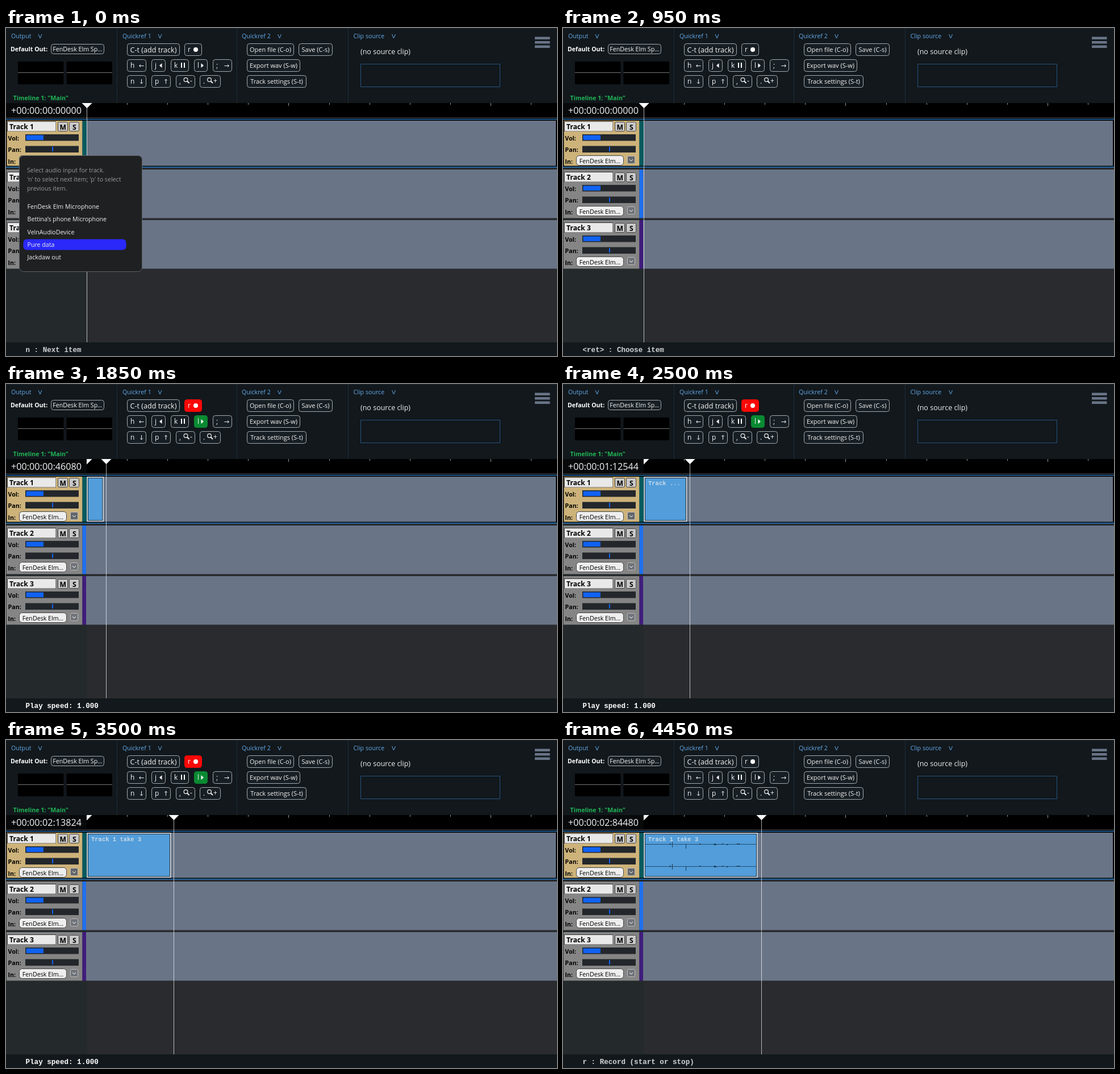
An HTML page with a canvas that plays this animation: 970 by 577 pixels, repeating every 4500 ms.

```html
<!DOCTYPE html>
<html lang="en">
<head>
<meta charset="utf-8">
<title>Audio workstation</title>
<style>
html, body { margin: 0; width: 100%; height: 100%; overflow: hidden; background: #12181c; }
canvas { display: block; }
</style>
</head>
<body>
<canvas id="stage" width="970" height="577"></canvas>
<script>
const ctx = document.getElementById('stage').getContext('2d');
const LOOP = 4500, STEP = 50;
const CLOSE = 750, REC = 1370, STOP = 4238;
const ORIGIN = 142.3, PX_PER_SEC = 71.12, RATE = 96000, BLOCK = 1024;
const TAIL = 2; // blocks played after the last clock update
const SANS = '"Open Sans", "Noto Sans", sans-serif';
const MONO = '"Liberation Mono", "DejaVu Sans Mono", monospace';
const BODY = 10.67;
const BACK = '#292b2e', FOCUS = '#2a86d6';
const DEVICE = 'FenDesk Elm';
const INPUTS = [DEVICE + ' Microphone', 'Bettina’s phone Microphone', 'VelnAudioDevice', 'Pure data', 'Jackdaw out'];

// time in ms, audio blocks played
const PROGRESS = [[REC, 0], [1850, 45], [2500, 106], [3100, 164], [3950, 243], [STOP, 270]];

function blocksAt(t) {
  if (t <= REC) return 0;
  for (let i = 1; i < PROGRESS.length; i++) {
    const [t0, b0] = PROGRESS[i - 1], [t1, b1] = PROGRESS[i];
    if (t <= t1) return Math.round(b0 + (b1 - b0) * (t - t0) / (t1 - t0));
  }
  return PROGRESS[PROGRESS.length - 1][1];
}

const blockX = blocks => ORIGIN + blocks * BLOCK / RATE * PX_PER_SEC;

function rect(x, y, w, h, color) {
  ctx.fillStyle = color;
  ctx.fillRect(x, y, w, h);
}

function frame(x, y, w, h, color) {
  ctx.strokeStyle = color;
  ctx.lineWidth = 1;
  ctx.strokeRect(x + .5, y + .5, w - 1, h - 1);
}

function roundBox(x, y, w, h, r, fill, stroke) {
  ctx.beginPath();
  ctx.roundRect(x + .5, y + .5, w - 1, h - 1, r);
  ctx.fillStyle = fill;
  ctx.fill();
  if (stroke) {
    ctx.strokeStyle = stroke;
    ctx.lineWidth = 1;
    ctx.stroke();
  }
}

function text(str, x, y, color, size = BODY, weight = 400, align = 'left', family = SANS) {
  ctx.font = `${weight} ${size}px ${family}`;
  ctx.textAlign = align;
  ctx.fillStyle = color;
  ctx.fillText(str, x, y);
}

function poly(points, color) {
  ctx.beginPath();
  points.forEach(([x, y]) => ctx.lineTo(x, y));
  ctx.fillStyle = color;
  ctx.fill();
}

function line(points, color, width = 1) {
  ctx.beginPath();
  points.forEach(([x, y]) => ctx.lineTo(x, y));
  ctx.strokeStyle = color;
  ctx.lineWidth = width;
  ctx.stroke();
}

function button(x, y, w, label, size = 11, h = 22) {
  roundBox(x, y, w, h, 4, '#181f24', '#a3abb0');
  text(label, x + w / 2, y + h / 2 + size * .36, '#f4f4f4', size, 400, 'center');
}

function key(x, y, w, label, lit) {
  roundBox(x, y, w, 22, 4, lit || '#181f24', lit || '#a3abb0');
  text(label, x + 6, y + 15, '#f4f4f4', 12);
}

function arrow(x, y, angle) {
  ctx.save();
  ctx.translate(x, y);
  ctx.rotate(angle);
  line([[-4, 0], [3.5, 0]], '#eee');
  line([[1.5, -2.3], [4, 0], [1.5, 2.3]], '#eee');
  ctx.restore();
}

function magnifier(x, y) {
  ctx.beginPath();
  ctx.arc(x, y, 3.4, 0, Math.PI * 2);
  ctx.strokeStyle = '#eee';
  ctx.lineWidth = 1.2;
  ctx.stroke();
  line([[x + 2.5, y + 2.5], [x + 6, y + 6]], '#eee', 2);
}

function heading(label, x, chevronX) {
  text(label, x, 18, '#62a9ea');
  line([[chevronX - 3, 11], [chevronX, 18], [chevronX + 3, 11]], '#62a9ea');
}

function drawPanel(recording) {
  rect(0, 0, 970, 132, '#12181c');
  rect(0, 0, 970, 1, '#1b2730');
  for (const x of [195, 406, 602]) rect(x, 1, 1, 131, '#1d2e3c');

  heading('Output', 9, 60);
  heading('Quickref 1', 205, 271);
  heading('Quickref 2', 415, 481.5);
  heading('Clip source', 611.5, 682.5);

  text('Default Out:', 8, 41, '#fff', 10.6, 700);
  button(79, 28, 94, DEVICE + ' Sp...', BODY, 18);
  for (const x of [21, 106.5]) {
    rect(x, 59, 80.5, 40, '#000');
    rect(x, 78, 80.5, 1, '#777');
  }
  text('Timeline 1: "Main"', 12.5, 127, '#20b656', 10.66, 700);

  button(213, 27, 93, 'C-t (add track)', 12.6);
  key(314, 27, 31, 'r', recording && '#fa0808');
  ctx.beginPath();
  ctx.arc(334, 38, 4, 0, Math.PI * 2);
  ctx.fillStyle = '#fff';
  ctx.fill();

  key(213, 55, 34, 'h');
  arrow(238.5, 66.5, Math.PI);
  key(256, 55, 25, 'j');
  poly([[274.5, 62], [274.5, 70], [270, 66]], '#fff');
  key(290, 55, 32, 'k');
  rect(308, 61, 2, 9, '#fff');
  rect(313, 61, 2, 9, '#fff');
  key(331, 55, 24, 'l', recording && '#0a8a32');
  poly([[343.5, 62], [343.5, 70], [348, 66]], '#fff');
  key(364, 55, 34, ';');
  arrow(388.5, 66.5, 0);

  key(213, 83, 34, 'n');
  arrow(238.5, 94, Math.PI / 2);
  key(256, 83, 34, 'p');
  arrow(281.5, 94, -Math.PI / 2);
  key(299, 83, 34, ',');
  magnifier(316.5, 91);
  text('-', 324, 97, '#f4f4f4', 12);
  key(341, 83, 37, '.');
  magnifier(358, 91);
  text('+', 365, 97, '#f4f4f4', 12);

  button(424, 27, 83, 'Open file (C-o)');
  button(515, 27, 60, 'Save (C-s)');
  button(424, 55, 94, 'Export wav (S-w)');
  button(424, 83, 105, 'Track settings (S-t)');

  text('(no source clip)', 624, 46, '#f0f0f0', 12.5);
  frame(624, 63, 246, 41, '#27507c');
  for (let i = 0; i < 3; i++) rect(931, 15.5 + i * 7.5, 26.5, 4.5, '#697487');
}

function drawRuler(blocks) {
  rect(0, 132, 970, 25, '#000');
  rect(0, 132, 142, 25, '#08090a');
  for (let i = 1; i < 12; i++) {
    rect(Math.round(ORIGIN + i * PX_PER_SEC - .5), 132, 1, i % 5 ? 3 : 5, '#9a9a9a');
  }
  const samples = blocks * BLOCK;
  const secs = String(Math.floor(samples / RATE)).padStart(2, '0');
  const rest = String(samples % RATE).padStart(5, '0');
  text(`+00:00:${secs}:${rest}`, 9, 150.5, '#f4f4f4', 16.2);
}

function drawTrack(n) {
  const y = 160 + (n - 1) * 89, selected = n === 1;
  rect(141, y, 829, 85.4, '#697487');
  rect(0, y, 134.5, 85.4, selected ? '#cdb37a' : '#858585');
  rect(134.5, y, selected ? 7.5 : 6.5, 85.4, ['#075a5e', '#2070ee', '#401c7c'][n - 1]);
  rect(0, y, 1, 85.4, '#3a3c3d');

  if (selected) {
    rect(0, 159, 970, 4, '#000');
    rect(0, 242.5, 970, 3, '#000');
    rect(0, 160, 970, 1.2, FOCUS);
    rect(0, 244, 970, 1.4, FOCUS);
    rect(0, 162, 1.5, 82, '#000');
    rect(968, 162, 2, 82, '#000');
  }

  rect(2, y + 4, 86, 18, '#333');
  rect(3, y + 5, 84.5, 16.5, '#e9e9e9');
  text('Track ' + n, 6, y + 18, '#000', 12.2, 700);
  for (const [label, x] of [['M', 91], ['S', 111]]) {
    roundBox(x, y + 5, 18, 17, 2, '#c9c9c9', '#444');
    text(label, x + 9.3, y + 18.5, '#000', 12.2, 700, 'center');
  }

  text('Vol:', 3.5, y + 37.5, '#000', BODY, 700);
  text('Pan:', 3.5, y + 58, '#000', BODY, 700);
  text('In:', 3.5, y + 78.5, '#000', BODY, 700);
  for (const dy of [27, 47.5]) rect(34, y + dy, 94, 11.5, '#23272b');
  rect(35.5, y + 28.5, 30.5, 8.5, '#1062f2');
  rect(81, y + 49, 2, 8, '#1062f2');

  roundBox(23, y + 64, 84, 18, 5, '#eeeeee', '#444');
  text(DEVICE + '...', 65, y + 77.5, '#000', BODY, 400, 'center');
  roundBox(113, y + 65, 14, 14, 2, selected ? '#62666a' : '#70747a', '#bbb');
  line([[117, y + 71], [120, y + 74], [123, y + 71]], '#fff');
}

function drawWave(right) {
  // x, height above, height below
  const peaks = [[188, 2, 1], [192, 4, 5], [216, 0, 7], [240, 1, 0], [266, 1, 1],
    [268, 0, 1], [280, 1, 0], [288, 0, 1], [306, 1, 0], [309, 1, 0]];
  for (const y of [183, 222]) {
    rect(145, y, right - 147, 1, '#234e70');
    for (const [x, up, down] of peaks) rect(x, y - up, up + down > 2 ? 1 : 2, up + down + 1, '#1a3a54');
  }
}

function drawClip(end, finished) {
  const right = end - 4.5, left = 142.5, width = right - left;
  if (width < 5) return;
  rect(left, 163.3, width, 78.7, '#eef2f5');
  rect(left + 1.4, 164.7, width - 2.8, 75.9, '#16222c');
  rect(left + 2.4, 165.7, width - 4.8, 73.9, '#529dda');
  if (finished) drawWave(right);

  const name = 'Track 1 take 3';
  const room = Math.floor((width - 14) / 6.3);
  if (room >= 4) {
    const label = room >= name.length ? name : name.slice(0, room - 3) + '...';
    text(label, 150, 178, '#c8d9e8', 10.5, 700, 'left', MONO);
  }
}

function drawPlayhead(head) {
  const x = Math.round(head);
  poly([[142, 132], [151.5, 132], [142, 141.5]], '#fff');
  poly([[x - 8.5, 132], [x + 9.5, 132], [x + .5, 141]], '#fff');
  rect(x, 132, 1, 421, 'rgba(255,255,255,.68)');
}

function drawMenu(active) {
  roundBox(23, 224, 217, 205, 7, '#1f2021', '#5c6165');
  const hint = ['Select audio input for track.', "'n' to select next item; 'p' to select", 'previous item.'];
  hint.forEach((s, i) => text(s, 37, 253.5 + i * 16, '#98999b'));
  INPUTS.forEach((s, i) => {
    const y = 314 + i * 22.25;
    if (i === active) roundBox(30, Math.round(y - 10), 182, 20, 6, '#2a29fa');
    text(s, 37.5, y + 4, '#efefef');
  });
}

function drawStatus(t) {
  rect(0, 553, 970, 24, '#12181c');
  let message = 'n : Next item', color = '#d2d4d6';
  if (t >= STOP) message = 'r : Record (start or stop)';
  else if (t >= REC) {
    message = 'Play speed: 1.000';
    color = '#fff';
  } else if (t >= CLOSE) message = '<ret> : Choose item';
  text(message, 34.5, 570, color, 12.58, 700, 'left', MONO);
}

function draw(t) {
  const stopped = t >= STOP;
  const blocks = blocksAt(t);

  rect(0, 132, 142, 421, '#242a2c');
  rect(142, 132, 828, 421, BACK);
  drawPanel(t >= REC && !stopped);
  drawRuler(blocks);
  for (let n = 1; n <= 3; n++) drawTrack(n);
  if (blocks) drawClip(blockX(blocks), stopped);
  drawPlayhead(blockX(stopped ? blocks + TAIL : blocks));
  if (t < CLOSE) drawMenu(t < 250 ? 3 : t < 500 ? 4 : 0);
  drawStatus(t);
}

const start = performance.now();
let shown = -1;
function tick() {
  const t = Math.floor((performance.now() - start) % LOOP / STEP) * STEP;
  if (t !== shown) draw(shown = t);
  requestAnimationFrame(tick);
}
tick();
</script>
</body>
</html>
```
